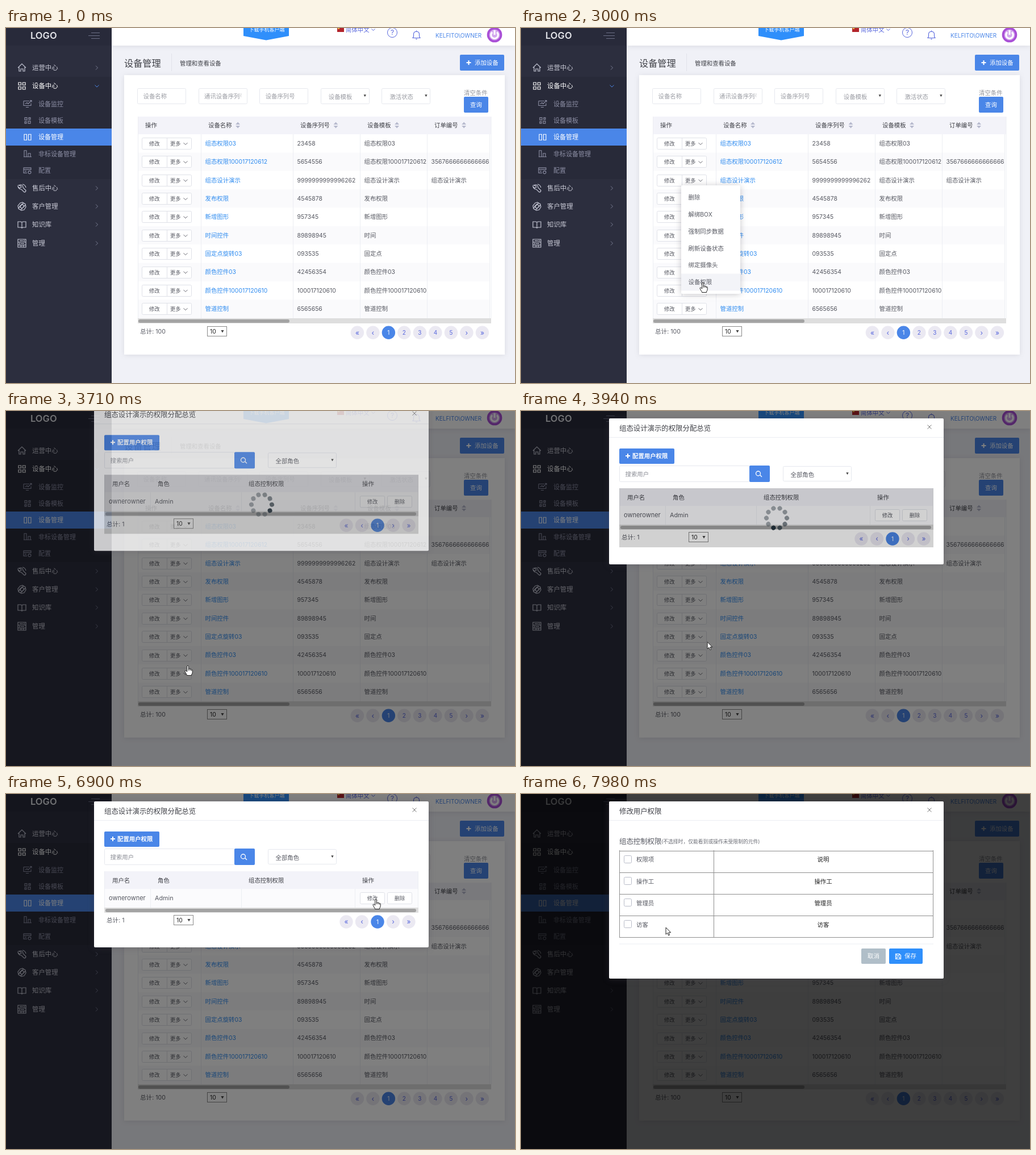
Recreate the animation shown at these times as an HTML page. Size 896x625 px, loop 8000 ms.

```html
<!DOCTYPE html>
<html lang="zh-CN">
<head>
<meta charset="utf-8">
<style>
html, body { margin: 0; width: 100%; height: 100%; overflow: hidden; background: #f0f1f7; }
#stage { display: block; width: 896px; height: 625px; font-family: Inter, "Noto Sans CJK SC", "Noto Sans CJK", sans-serif; }
.card { filter: drop-shadow(0 1px 5px rgba(69, 65, 78, .12)); }
.float { filter: drop-shadow(0 1px 6px rgba(69, 65, 78, .3)); }
</style>
</head>
<body>
<svg id="stage" viewBox="0 0 896 625"></svg>
<script>
const BLUE = '#4a86e8', INK = '#575962', DARK = '#3f4047', LINK = '#2f8cf0', VIOLET = '#5867dd', EDGE = '#e6e8ee';
const MID = 'text-anchor="middle"', BOLD = 'font-weight="500"';

const rect = (x, y, w, h, fill, extra = '') =>
  `<rect x="${x}" y="${y}" width="${w}" height="${h}" fill="${fill}" ${extra}/>`;
const box = (x, y, w, h, stroke = EDGE, fill = '#fff', r = 2) =>
  rect(x + .5, y + .5, w - 1, h - 1, fill, `stroke="${stroke}" rx="${r}"`);
const text = (x, y, s, size = 10.4, fill = INK, extra = '') =>
  `<text x="${x}" y="${y + size * .37}" font-size="${size}" fill="${fill}" ${extra}>${s}</text>`;
const path = (d, stroke, w = 1, fill = 'none', extra = '') =>
  `<path d="${d}" stroke="${stroke}" stroke-width="${w}" fill="${fill}" ${extra}/>`;
const icon = (x, y, d, color, w = 1.2) => path(d, color, w, 'none', `transform="translate(${x} ${y})"`);
const group = (id, s, extra = '') => `<g id="${id}" ${extra}>${s}</g>`;
const clip = (x, y, w, h, s) =>
  `<svg x="${x}" y="${y}" width="${w}" height="${h}" viewBox="${x} ${y} ${w} ${h}">${s}</svg>`;

const button = (x, y, w, h, s, fill = BLUE) =>
  rect(x, y, w, h, fill, 'rx="2"') + text(x + w / 2, y + h / 2, s, 10.4, '#fff', `${MID} ${BOLD}`);
const plus = (x, y) => path(`M${x - 4} ${y}h8m-4-4v8`, '#fff', 2);
const arrow = (x, y, s = 2.6) => path(`M${x - s} ${y - s * .8}h${2 * s}l${-s} ${s * 1.8}z`, 'none', 0, '#444');
const sort = (x, y) => path(`M${x - 4} ${y - 1}h8l-4-4.5zm0 2h8l-4 4.5z`, 'none', 0, '#b7bace');
const small = (x, y, s) => box(x, y, 44, 21, '#dfe1e8') + text(x + 22, y + 10.5, s, 9.3, INK, MID);
const pageSize = (x, y) => box(x, y, 35, 18, '#8a8a8a', '#fff', 0) + text(x + 5, y + 9, '10', 10.4, '#222') + arrow(x + 27, y + 9);
const scrollbar = (x, y, w, from, len) => rect(x, y, w, 9, '#dedede') + rect(from, y + 2, len, 6, '#a3a3a3', 'rx="3"');
const pager = (x, y, labels) => labels.map((s, i) => {
  const on = s === '1', cx = x + i * 27.5;
  return `<circle cx="${cx}" cy="${y}" r="11.7" fill="${on ? BLUE : '#ebe9f2'}"/>` +
    text(cx, y, s, /\d/.test(s) ? 10 : 12, on ? '#fff' : VIOLET, MID);
}).join('');

function sidebar() {
  const menu = [
    [70, '运营中心', 'M-7 0L0-7L7 0M-5-1V6H-2V2H2V6H5V-1'],
    [102, '设备中心', 'M-6-6h4.5v4.5h-4.5zM1.5-6h4.5v4.5h-4.5zM-6 1.5h4.5v4.5h-4.5zM1.5 1.5h4.5v4.5h-4.5z'],
    [282, '售后中心', 'M-6-5L-3-6Q2-6 2-1L7 4Q7 7 4 7L-1 2Q-6 2-7-3L-4 0L-1-2L-2-4zM1-7Q6-6 7-1'],
    [314, '客户管理', 'M-3-6L1-7L6-4L7 1L4 6L-1 7L-6 4L-7-1zM-4 0L0-4L4-1L0 4zM-6 3L3-6M-2 6L6-2'],
    [346, '知识库', 'M-7-5H-2L0-4L2-5H7V5H2L0 6L-2 5H-7zM0-4V6'],
    [379, '管理', 'M-7-7H7V7H-7zM-7-2H7M-7 3H7M-4-4.5H2M4-6V-3M-2 .5H4M-4-1V2M-4 5H1M3 3.5V6.5']
  ];
  const sub = [
    ['设备监控', 'M-7-5H3M-7-5V3H6V-1M-3 6H2M-4 0L-1-2L1 0L7-6M4-6H7V-3'],
    ['设备模板', 'M-5-5h4v4h-4zM2-5h3v3h-3zM-5 2h3v3h-3zM1 1h4v4h-4z'],
    ['设备管理', 'M-6-5h4.5v10h-4.5zM1.5-5h4.5v10h-4.5z'],
    ['非标设备管理', 'M-6-6h4v11h-4zM1-1h4v6h-4zM-7 5H7'],
    ['配置', 'M-1 4H-7V-5H6V-1M-7-2H6M1 3a2.5 2.5 0 1 0 5 0a2.5 2.5 0 1 0-5 0M-5 1H-2']
  ];
  let s = rect(0, 0, 186, 625, '#2c2e3e') + rect(0, 0, 186, 31, '#282a3a') + rect(0, 86, 186, 180, '#282a39') +
    rect(0, 177, 186, 30, BLUE) + text(43, 13, 'LOGO', 16.5, '#e4e5ea', 'font-weight="600"') +
    path('M150 8.5H165M145 13.5H165M150 18.5H165', '#6c6f86');
  for (const [y, label, d] of menu) {
    const open = y === 102;
    s += icon(28, y, d, open ? '#fff' : '#c3c5d3') + text(46, y, label, 11.4, open ? '#fff' : '#c9cad6', BOLD) +
      (open ? path('M156.5 100.5l3.5 3.5l3.5-3.5', BLUE) : path(`M158 ${y - 3.5}l3.5 3.5l-3.5 3.5`, '#777a91'));
  }
  sub.forEach(([label, d], i) => {
    const y = 133.5 + i * 29.4, c = i === 2 ? '#fff' : '#8c8ea4';
    s += icon(38, y, d, c, 1.1) + text(57, y, label, 11, c, i === 2 ? BOLD : '');
  });
  return s;
}

function header() {
  return rect(186, 0, 710, 31, '#fff', 'class="card"') +
    path('M418 0H498V14L458 21.5L418 14z', 'none', 0, '#2f8ffb') + text(459, 3, '下载手机客户端', 9, '#fff', `${MID} ${BOLD}`) +
    rect(583, 0, 12, 7, '#b3252b') + rect(584, 0, 3, 2, '#e8b53c') +
    text(598, 3, '简体中文', 10.4, VIOLET) + path('M643.5 1.5l3 3l3-3', VIOLET) +
    `<circle cx="680" cy="8" r="8.5" fill="none" stroke="${VIOLET}"/>` + text(680, 8, '?', 12, VIOLET, MID) +
    group('bell', path('M716 17.5H729L727.5 15V11Q727.5 6.5 722.5 6Q717.5 6.5 717.5 11V15zM721 19.5H724M722.5 4.5V6', VIOLET, 1.1)) +
    text(756, 13, 'KELFITO\\OWNER', 10, BLUE) +
    `<circle cx="860" cy="12" r="13.3" fill="#a94fd6"/><circle cx="860" cy="12" r="9.5" fill="#d3a8ee"/>` +
    path('M856 7.5a6.2 6.2 0 1 0 8 0M860 4V12', '#fff', 3);
}

function devices() {
  let s = text(208, 62, '设备管理', 16.2, DARK) + path('M291.5 45V76', '#e1e3ea') +
    text(306, 62.5, '管理和查看设备', 10.4, DARK) +
    rect(799, 47, 78, 28, BLUE, 'rx="2"') + plus(814.5, 61) + text(825, 61, '添加设备', 10.4, '#fff', BOLD) +
    rect(208, 83, 670, 492, '#fff', 'class="card"');
  ['设备名称', '通讯设备序列号', '设备序列号', '设备模板', '激活状态'].forEach((label, i) => {
    const x = 231 + i * 107.6, pick = i > 2;
    s += box(Math.round(x), 106, 86, 28) +
      clip(x, 106, 75.5, 28, text(x + (pick ? 14 : 10.5), pick ? 121 : 120.5, label, 10.4, '#9a9ca3')) + (pick ? arrow(x + 78, 119, 2.2) : '');
  });
  s += text(806, 114, '清空条件', 10.4, '#8f9199') + button(806, 121, 43, 28, '查询') + rect(232, 156, 622, 31, '#f3f3f9');

  const cols = [[245, '操作'], [356, '设备名称'], [518, '设备序列号'], [636, '设备模板'], [754, '订单编号']];
  cols.forEach(([x, label], i) => {
    s += text(x, 171.5, label, 10.4, DARK, BOLD) + (i ? sort(x + label.length * 10.4 + 10.5, 171) : '');
  });
  const rows = [
    ['组态权限03', '23458'], ['组态权限100017120612', '5654556', 0, '3567666666666666666'],
    ['组态设计演示', '9999999999996262', 0, '组态设计演示'], ['发布权限', '4545878'], ['新增图形', '957345'],
    ['时间控件', '89898945', '时间'], ['固定点旋转03', '093535', '固定点'], ['颜色控件03', '42456354'],
    ['颜色控件100017120610', '100017120610'], ['管道控制', '6565656']
  ];
  let body = '';
  rows.forEach(([name, serial, model, order = ''], i) => {
    const y = 203 + i * 32.37, top = Math.round(y - 10);
    body += rect(232, y - 16, 622, 32.4, i % 2 ? '#fafafc' : '#fff') +
      box(239, top, 88, 21, '#dfe1e8') + path(`M283.5 ${top}v21`, '#dfe1e8') +
      text(252, y + .5, '修改', 9.3) + text(289, y + .5, '更多', 9.3) + path(`M312.5 ${y - 1}l3.5 3.5l3.5-3.5`, INK, .9) +
      text(350.5, y, name, 10.4, LINK) + text(512.5, y, serial) + text(630.5, y, model || name) + text(748.5, y, order);
  });
  s += clip(232, 186, 619.5, 326, body) +
    path('M343.5 187V511M505.5 187V511M623.5 187V511M741.5 187V511M851.5 187V511M232.5 156V511M854 156V511', '#eceef3') +
    scrollbar(232, 511, 622, 233, 266);
  return s + text(236, 534, '总计: 100', 10.6) + pageSize(354, 525) +
    pager(618.4, 536.3, ['«', '‹', '1', '2', '3', '4', '5', '›', '»']);
}

function dropdown() {
  const items = ['删除', '解绑BOX', '强制同步数据', '刷新设备状态', '绑定摄像头', '设备权限'];
  return rect(282, 277, 104, 191, '#fff', 'rx="2" class="float"') + rect(282, 0, 104, 30, '#f3f4f8', 'id="hover"') +
    items.map((s, i) => text(294.5, 298 + i * 29.9, s)).join('');
}

const dialog = (h, title) => rect(155, 13, 589, h, '#fff', 'rx="2" class="float"') + text(173, 30, title, 12.4, DARK) +
  path('M715.5 24.5l7 7m0-7l-7 7', '#777') + path('M155 46.5H744', '#ebedf2');

function overview() {
  let dots = '';
  for (let i = 0; i < 10; i++) {
    const a = i * Math.PI / 5;
    dots += `<circle cx="${18 * Math.cos(a)}" cy="${18 * Math.sin(a)}" r="4" fill="#1d2a33" opacity="${.4 + .6 * (i / 9) ** 5}"/>`;
  }
  return dialog(257, '组态设计演示的权限分配总览') +
    rect(173, 66, 97, 27, BLUE, 'rx="2"') + plus(188, 79) + text(196, 79, '配置用户权限', 10.4, '#fff', 'font-weight="600"') +
    box(173, 96, 230, 29) + text(183.5, 111, '搜索用户', 10.4, '#8d8f97') + rect(402, 96, 36, 29, BLUE, 'rx="2"') +
    path('M421 113l3 3M413.5 110a4 4 0 1 0 8 0a4 4 0 1 0-8 0', '#fff', 1.3) +
    box(461, 97, 121, 27) + text(474.5, 112, '全部角色') + arrow(574.5, 110, 2.2) +
    rect(173, 136, 553, 31, '#f3f3f9') +
    [[187, '用户名'], [267, '角色'], [427, '组态控制权限'], [627, '操作']].map(([x, s]) => text(x, 152, s, 10.4, DARK, BOLD)).join('') +
    rect(173, 167, 553, 33, '#fbfbfd') +
    path('M254.5 167V200M414.5 167V200M614.5 167V200M173.5 136V200M725.5 136V200', '#eceef3') +
    text(181, 183, 'ownerowner', 11) + text(262, 183, 'Admin', 10.8) + small(623, 173, '修改') + small(671, 173, '删除') +
    scrollbar(173, 200, 553, 175, 547) + text(177, 222.5, '总计: 1', 10.6) + pageSize(295, 213) +
    pager(599, 225, ['«', '‹', '1', '›', '»']) +
    group('loading', rect(173, 136, 553, 104, '#000', 'opacity=".18"') + `<g transform="translate(450 188.5)">${group('spin', dots)}</g>`);
}

function editor() {
  let s = dialog(312, '修改用户权限') + text(173, 83, '组态控制权限', 12.4) +
    text(247, 83.5, '(不选择时，仅能看到或操作未受限制的元件)', 8.8, '#6c6e76');
  ['权限项', '操作工', '管理员', '访客'].forEach((label, i) => {
    const y = 115.5 + i * 38.3;
    s += box(181, Math.round(y - 8), 14, 14, '#b9bcc8') + text(203, y, label) +
      text(532, y, i ? label : '说明', 10.4, '#222', MID) + path(`M173 ${Math.round(y - 16) + .5}H726`, '#8f8f8f');
  });
  return s + path('M173.5 99V253M339.5 99V253M725.5 99V253M173 252.5H726', '#8f8f8f') + path('M173 264H726', '#ebedf2') +
    button(599, 272, 43, 27, '取消', '#b0bec8') + rect(648, 272, 59, 27, '#2f8ffb', 'rx="2"') +
    path('M659.5 281.5H666L668.5 284V290.5H659.5zM661.5 281.5V284.5H665.5V281.5M661.5 290V287H666.5V290', '#fff', 1.2) +
    text(675, 285.5, '保存', 10.4, '#fff', BOLD);
}

const veil = id => rect(0, 0, 896, 625, '#000', `id="${id}" opacity=".5"`);
const stage = document.getElementById('stage');
stage.innerHTML = rect(0, 0, 896, 625, '#f0f1f7') + header() + sidebar() + devices() + group('menu', dropdown()) +
  veil('veil1') + group('dialog1', overview()) + veil('veil2') + group('dialog2', editor()) +
  group('cursor',
    path('M0 0V12.2L2.8 9.6L4.7 14L6.6 13.2L4.8 8.9H8.7Z', '#222', 1, '#fff', 'id="pointer"') +
    path('M-1.3 1Q0-.8 1.3 1V6.2Q2.8 5.2 4 6.6Q5.6 5.8 6.4 7.4Q8 7 8.2 9V12Q8 14.5 6.6 16V17.5H-1.6V16.5Q-3 14.5-5 10.6Q-5.2 8.6-3.4 9.2L-1.3 11ZM1.3 6V9M4 6.6V9.2M6.4 7.4V9.6', '#222', 1, '#fff', 'id="hand"'));

const el = id => document.getElementById(id);
const set = (id, name, value) => el(id).setAttribute(name, value);
const show = (id, on) => set(id, 'visibility', on ? 'visible' : 'hidden');
const clamp = v => Math.min(1, Math.max(0, v));
const within = (t, spans) => spans.some(([a, b]) => t >= a && t < b);

// time, x, y of the cursor tip
const route = [
  [70, 742, 580], [840, 368, 272], [1220, 298, 254], [1690, 301, 272], [2310, 301, 272], [2720, 345, 472],
  [3000, 320, 448], [3720, 320, 448], [4440, 356, 264], [4940, 565, 206], [5250, 642, 198],
  [6110, 651, 185], [7250, 651, 185], [7840, 376, 196], [7980, 255, 235], [8000, 255, 235]
];

function cursorAt(t) {
  const i = Math.max(1, route.findIndex(p => p[0] > t));
  const [a, x0, y0] = route[i - 1], [b, x1, y1] = route[i];
  const p = clamp((t - a) / (b - a)), k = p * p * (3 - 2 * p);
  return [x0 + (x1 - x0) * k, y0 + (y1 - y0) * k];
}

function drop(id, t, start) {
  const p = clamp((t - start) / 300);
  show(id, t >= start + 30);
  set(id, 'transform', `translate(0 ${-54 * (1 - p) ** 2})`);
  set(id, 'opacity', clamp((t - start) / 130));
}

function draw(now) {
  const t = now % 8000, [x, y] = cursorAt(t);
  const ringing = within(t, [[70, 1930], [4000, 6170], [7060, 7860]]);
  set('bell', 'transform', `rotate(${ringing ? -9 * Math.cos((t - 1220) / 52) : 0} 722.5 6)`);

  const hand = within(t, [[1450, 3780], [5200, 7320]]);
  show('cursor', t >= 70);
  set('cursor', 'transform', `translate(${x} ${y})`);
  set('pointer', 'opacity', hand ? 0 : 1);
  set('hand', 'opacity', hand ? 1 : 0);

  const row = Math.floor((y - 283) / 29.9);
  set('menu', 'display', within(t, [[1760, 3470]]) ? 'inline' : 'none');
  set('hover', 'y', 283 + row * 29.9);
  show('hover', row >= 0 && row < 6);

  show('veil1', t >= 3470);
  show('veil2', t >= 6970);
  drop('dialog1', t, 3610);
  drop('dialog2', t, 7030);
  set('loading', 'display', t < 4200 ? 'inline' : 'none');
  set('spin', 'transform', `rotate(${Math.floor((t - 3700) / 100) * 36 + 72})`);
  requestAnimationFrame(draw);
}
requestAnimationFrame(draw);
</script>
</body>
</html>
```
